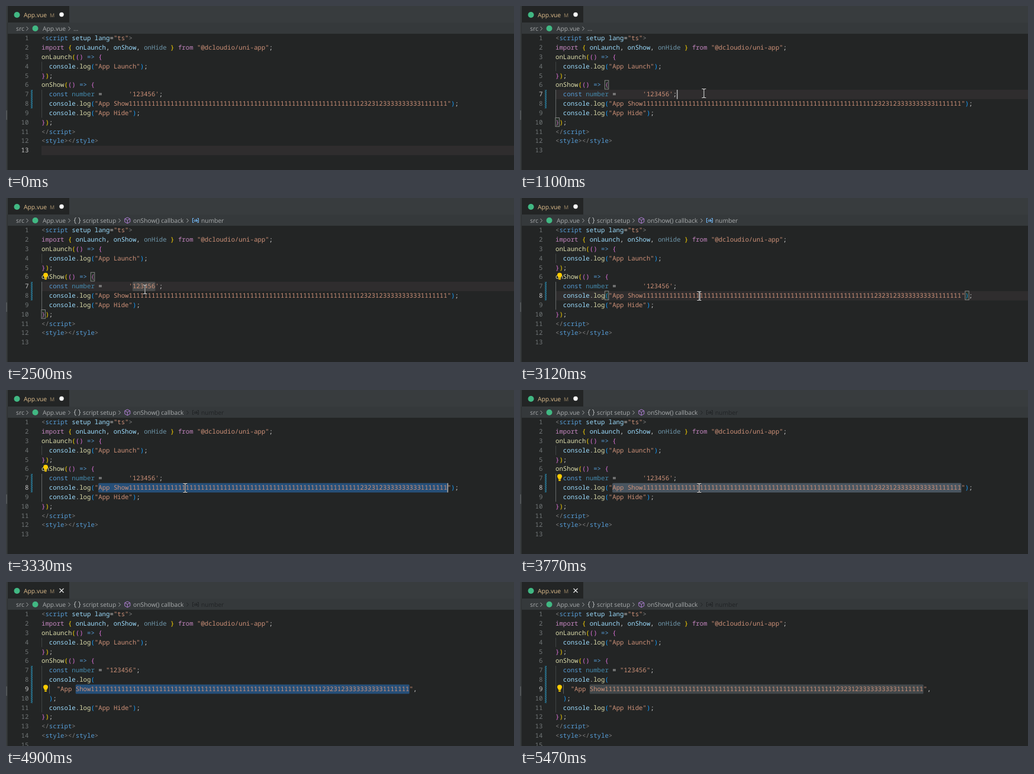
These frames come from a looping animation (859x278 px, 5570 ms). An HTML page:

```html
<!DOCTYPE html>
<html lang="en">
<head>
<meta charset="utf-8">
<title>Editor: format on save</title>
<style>
html, body { margin: 0; width: 100%; height: 100%; overflow: hidden; background: #232525; }
svg { display: block; width: 859px; height: 278px; }
text { white-space: pre; text-rendering: geometricPrecision; }
.code { font: 10.69px "Noto Sans Mono", monospace; }
.ui { font: 10.3px "Open Sans", sans-serif; fill: #a9acad; }
</style>
</head>
<body>
<svg id="stage" viewBox="0 0 859 278"></svg>
<script>
const LOOP = 5570, LEFT = 60, CHAR = 6.414, TOP = 47, ROW = 15.83;
const stage = document.getElementById('stage');
const colX = c => LEFT + c * CHAR;
const rowY = r => TOP + (r - 1) * ROW;

function el(parent, tag, attrs = {}, text) {
  const node = document.createElementNS('http://www.w3.org/2000/svg', tag);
  for (const k in attrs) node.setAttribute(k, attrs[k]);
  if (text !== undefined) node.textContent = text;
  parent.appendChild(node);
  return node;
}
const group = parent => el(parent, 'g');
const rect = (p, x, y, width, height, fill) => el(p, 'rect', { x, y, width, height, fill });
const path = (p, d, stroke, w = 1) =>
  el(p, 'path', { d, stroke, fill: 'none', 'stroke-width': w });
const label = (p, x, y, s, fill = '#a9acad') => el(p, 'text', { x, y, class: 'ui', fill, style: `fill:${fill}` }, s);
const show = (node, on) => node.setAttribute('visibility', on ? 'visible' : 'hidden');

// "~k" switches to colour k of the palette
const palette = {
  w: '#d4d4d4', g: '#808080', b: '#569cd6', v: '#9cdcfe', s: '#ce9178', i: '#c586c0',
  f: '#dcdcaa', y: '#ffd700', p: '#da70d6', n: '#179fff', d: '#6f97ab', c: '#4489ad'
};
const digits = '1'.repeat(61) + '232312' + '3'.repeat(10) + '1'.repeat(7);
const open = '  ~vconsole~w.~flog~n(';
const log = s => `${open}~s"${s}"~n)~w;`;
const hook = name => `~f${name}~y(~p() ~b=> ~p{`;
const close = '~p}~y)~w;';
const head = [
  '~g<~bscript ~vsetup lang~w=~s"ts"~g>',
  '~iimport ~y{ ~vonLaunch~w, ~vonShow~w, ~donHide ~y} ~ifrom ~s"@dcloudio/uni-app"~w;',
  hook('onLaunch'), log('App Launch'), close, hook('onShow')
];
const tail = [log('App Hide'), close, '~g</~bscript~g>', '~g<~bstyle~g></~bstyle~g>', ''];
const docs = [
  [...head, "  ~bconst ~cnumber ~w=       ~s'123456'~w;", log('App Show' + digits), ...tail],
  [...head, '  ~bconst ~cnumber ~w= ~s"123456"~w;', open, `    ~s"App Show${digits}"~w,`, '  ~n)~w;', ...tail]
];

// window frame
rect(stage, 0, 0, 859, 28, '#383c3e');
rect(stage, 3, 0, 104, 28, '#232525');
rect(stage, 3, 28, 856, 19, '#35393b');
rect(stage, 0, 0, 2.5, 278, '#383c3e');
rect(stage, 0, 177, 2, 16, '#505456');

el(stage, 'circle', { cx: 18.5, cy: 15, r: 5, fill: '#41b883' });
label(stage, 30, 19, 'App.vue', '#e2c08d');
const mark = label(stage, 74, 18.6, 'M', '#9f8a68');
mark.style.fontSize = '9px';
const dot = el(stage, 'circle', { cx: 94, cy: 14.5, r: 3.7, fill: '#fff' });
const cross = path(stage, 'M90.5 11l7 7m0-7l-7 7', '#e8e8e8', 1.2);

// breadcrumbs
const chevron = (p, x, color = '#a0a3a4') => path(p, `M${x - 1.5} 35l3 3.3l-3 3.3`, color);
label(stage, 17, 42, 'src');
chevron(stage, 36);
el(stage, 'circle', { cx: 49.5, cy: 38, r: 5, fill: '#41b883' });
label(stage, 62, 42, 'App.vue');
chevron(stage, 107);
const dots = label(stage, 114, 42, '...');

const scope = group(stage);
const brace = 'M118.5 33.5q-2 0-2 2v1.5q0 1.3-1.3 1.3q1.3 0 1.3 1.3v1.5q0 2 2 2';
path(scope, brace, '#c5c8c9');
el(scope, 'path', { d: brace, transform: 'translate(241 0) scale(-1 1)', stroke: '#c5c8c9', fill: 'none' });
label(scope, 130, 42, 'script setup');
chevron(scope, 192);
path(scope, 'M205.3 33l4.5 2.3v5.2l-4.5 2.5l-4.5-2.5v-5.2zM200.8 35.3l4.5 2.3l4.5-2.3M205.3 37.6v5.2', '#b180d7');
label(scope, 215, 42, 'onShow() callback');
function symbol(text, icon) {
  const g = group(stage);
  chevron(g, 307, text);
  path(g, 'M317.5 34.5h-2v7h2M323.5 34.5h2v7h-2', icon);
  el(g, 'circle', { cx: 319.4, cy: 38.5, r: 1.4, stroke: icon, fill: 'none' });
  path(g, 'M321.9 35.5v4.3h1.6v-2.4h-1.6', icon);
  label(g, 330, 42, 'number', text);
  return g;
}
const crumb = symbol('#a9acad', '#75beff');
const ghost = symbol('#202325', '#202325');

// layers below the text
const lineBox = rect(stage, LEFT, 0, 800, ROW, '#2f2d2e');
const selBox = rect(stage, 0, 0, 0, ROW, '#264f78');
selBox.setAttribute('rx', 1.5);

const hatch = el(el(stage, 'defs'), 'pattern', {
  id: 'hatch', width: 2.2, height: 2.2, patternUnits: 'userSpaceOnUse', patternTransform: 'rotate(-45)'
});
rect(hatch, 0, 0, 2.2, 1.2, '#2a8fb5');
const bars = rect(stage, 42, rowY(7), 3, 0, 'url(#hatch)');

function guide(p, col, from, to, color = '#414444') {
  return rect(p, Math.round(colX(col)), rowY(from), 1, (to - from + 1) * ROW, color);
}

const views = docs.map((lines, k) => {
  const g = group(stage);
  guide(g, 0, 4, 4);
  const block = guide(g, 0, 7, k ? 11 : 9);
  if (k) guide(g, 2, 9, 9, '#5c5f5f');
  const nums = lines.map((line, i) => {
    const y = rowY(i + 1) + 11.3;
    const t = el(g, 'text', { x: LEFT, y, class: 'code', fill: palette.w });
    line.split('~').forEach((part, j) => {
      if (!j) el(t, 'tspan', {}, part);
      else el(t, 'tspan', { fill: palette[part[0]] }, part.slice(1));
    });
    return el(g, 'text', { x: 38.3, y, class: 'code', 'text-anchor': 'end' }, i + 1);
  });
  return { g, block, nums };
});

// layers above the text
const pairBoxes = [0, 1].map(() => el(stage, 'rect', {
  width: CHAR, height: ROW - 1, fill: 'rgba(0,100,0,.1)', stroke: '#888'
}));
const caretBox = rect(stage, 0, 0, 1.2, ROW, '#d8d8d8');
const bulb = group(stage);
el(bulb, 'path', { d: 'M-2 2.6C-2 1-4-.2-4-2.2A4 4 0 0 1 4-2.2C4-.2 2 1 2 2.6z', fill: '#ffcc00' });
rect(bulb, -1.8, 3.2, 3.6, 2.2, '#ffcc00');
const mouse = group(stage);
const beam = 'M-3.5-7.5h2.3L0-6.5L1.2-7.5h2.3M0-6.5v13M-3.5 7.5h2.3L0 6.5L1.2 7.5h2.3';
path(mouse, beam, '#1a1a1a', 2.2);
path(mouse, beam, '#e6e6e6', 1.1);

// [time, changes]; caret: [row, col], sel: [row, from, to, colour]
const BLUE = '#264f78';
const steps = [
  [0, { doc: 0, line: 13, lit: 1, caret: 0, sel: 0, pair: 0, bulb: 0, crumb: 0, saved: 0, bars: 2, focus: 0 }],
  [1010, { line: 7, caret: [7, 32], pair: [[6, 13], [10, 0]], focus: 1 }],
  [1230, { crumb: 1 }],
  [1320, { bulb: 6 }],
  [1510, { caret: [7, 28] }],
  [1880, { caret: 0 }],
  [2040, { caret: [7, 27] }],
  [2200, { crumb: 2 }],
  [2300, { sel: [7, 24, 30, '#4b4b4b'] }],
  [2500, { caret: 0 }],
  [2830, { pair: 0, sel: 0 }],
  [3050, { line: 8, caret: [8, 38], pair: [[8, 13], [8, 108]] }],
  [3250, { lit: 0, caret: [8, 107], sel: [8, 15, 107, BLUE] }],
  [3330, { pair: 0, crumb: 3 }],
  [3480, { bulb: 7 }],
  [3530, { sel: [8, 15, 107, '#495560'] }],
  [3770, { caret: 0 }],
  [4200, { doc: 1, line: 9, caret: [9, 97], sel: [9, 9, 97, BLUE] }],
  [4460, { saved: 1 }],
  [4640, { bars: 4 }],
  [4800, { bulb: 9 }],
  [4850, { caret: 0 }],
  [5360, { caret: [9, 97], sel: [9, 9, 97, '#42484b'] }],
  [5470, { caret: 0 }]
];

const moves = [
  [280, 256, 276], [430, 284, 240], [600, 322, 186], [820, 311, 148],
  [1170, 311, 148], [1510, 249, 149], [1600, 249, 149], [1650, 243, 149],
  [2040, 243, 149], [2350, 235, 155], [2680, 235, 155], [2830, 303, 166],
  [4200, 303, 166], [4390, 367, 177], [4600, 388, 222], [4750, 396, 258], [4900, 402, 284]
];

function place(node, row, col) {
  node.setAttribute('x', colX(col));
  node.setAttribute('y', rowY(row));
}

function moveMouse(t) {
  const i = moves.findIndex(m => m[0] > t);
  show(mouse, i > 0);
  if (i < 1) return;
  const [t0, x0, y0] = moves[i - 1], [t1, x1, y1] = moves[i];
  const k = (t - t0) / (t1 - t0);
  mouse.setAttribute('transform', `translate(${x0 + (x1 - x0) * k} ${y0 + (y1 - y0) * k})`);
}

function render(t) {
  const s = Object.assign({}, ...steps.filter(step => step[0] <= t).map(step => step[1]));
  views.forEach((v, k) => v.g.setAttribute('display', k === s.doc ? 'inline' : 'none'));
  const view = views[s.doc];
  view.nums.forEach((n, i) => n.setAttribute('fill', i + 1 === s.line ? '#c6c6c6' : '#717677'));
  view.block.setAttribute('fill', s.focus && !s.doc ? '#666969' : '#414444');

  show(lineBox, s.lit);
  lineBox.setAttribute('y', rowY(s.line));
  show(selBox, s.sel);
  if (s.sel) {
    const [row, from, to, fill] = s.sel;
    place(selBox, row, from);
    selBox.setAttribute('width', (to - from) * CHAR);
    selBox.setAttribute('fill', fill);
  }
  show(caretBox, s.caret);
  if (s.caret) place(caretBox, ...s.caret);
  pairBoxes.forEach((b, i) => {
    show(b, s.pair);
    if (s.pair) place(b, ...s.pair[i]);
  });
  show(bulb, s.bulb);
  bulb.setAttribute('transform', `translate(67 ${rowY(s.bulb) + 6.8})`);
  bars.setAttribute('height', s.bars * ROW);

  show(dots, s.crumb === 0);
  show(scope, s.crumb > 0);
  show(crumb, s.crumb === 2);
  show(ghost, s.crumb === 3);
  show(dot, !s.saved);
  show(cross, s.saved);
  moveMouse(t);
}

const start = performance.now();
function tick() {
  render((performance.now() - start) % LOOP);
  requestAnimationFrame(tick);
}
tick();
</script>
</body>
</html>
```
